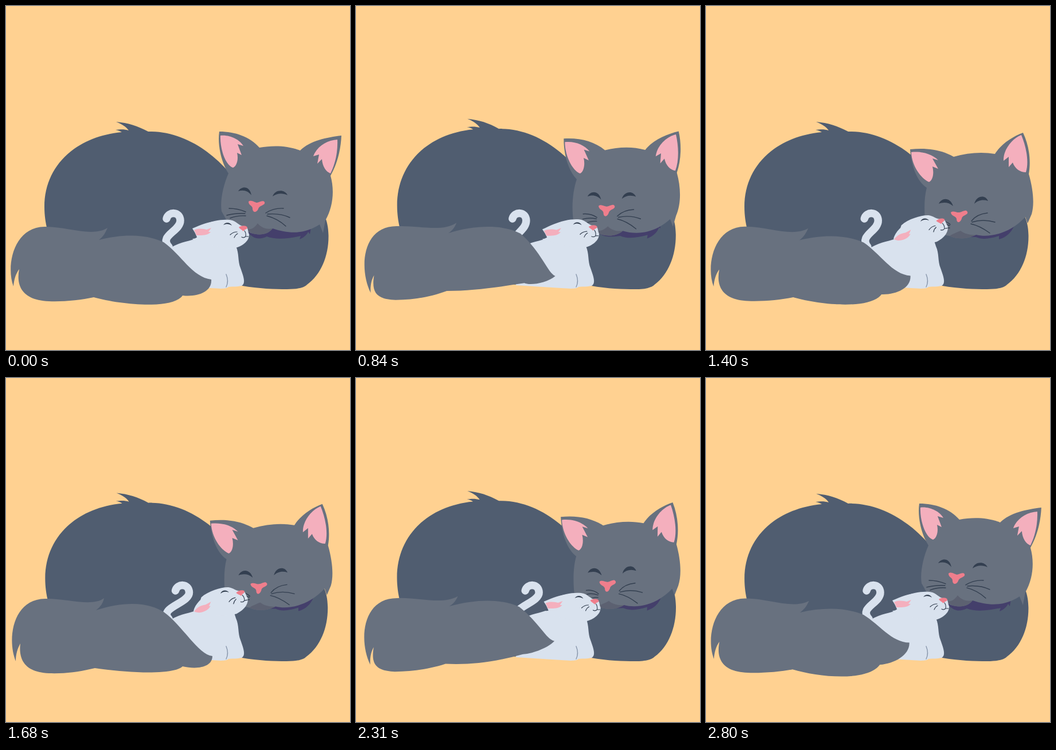
These frames come from a looping animation (600x600 px, 2.87 s). An HTML page:

```html
<!DOCTYPE html>
<html lang="en">
<head>
<meta charset="utf-8">
<title>Cat and kitten</title>
<style>
html, body { margin: 0; width: 100%; height: 100%; overflow: hidden; background: #ffd191; }
svg { display: block; width: 100vw; height: 100vh; }
.line { fill: none; stroke: #333f50; stroke-width: 1.4; stroke-linecap: round; }
</style>
</head>
<body>
<svg viewBox="0 0 600 600">
  <rect width="600" height="600" fill="#ffd191"/>
  <g id="cat">
    <path fill="#505d70" d="M248 219C229 209 213 204 192 202C202 206 209 210 214 217C207 215 201 215 191 216C196 217 199 218 202 220C120 228 67 280 67 350C67 365 69 378 72 390L90 486L405 486L412 488C440 493 470 494 490 494C510 494 520 491 525 486C550 468 563 435 562.5 400C562 385 560 375 555 365L480 300L390 291C350 245 300 218 248 219Z"/>
    <g id="head">
      <path id="collar" fill="#443f6b"/>
      <path id="skull" fill="#68717f"/>
      <path id="chin" fill="#5c6171"/>
      <path id="earL" fill="#f4afbd"/>
      <path id="earR" fill="#f4afbd"/>
      <path id="eyes" fill="#333f50"/>
      <path id="whiskers" class="line"/>
      <path id="nose" fill="#ef7e8c"/>
    </g>
  </g>
  <path id="curl" fill="none" stroke="#d9e2ee" stroke-width="13.5" stroke-linecap="round"/>
  <path fill="#d9e2ee" d="M288 421C305 411 322 410 336 404L395 400L401 419C407 432 404 445 409 457C414 471 419 484 411 488C403 490 396 489 388 490C384 494 372 493 358 492L279 487C277 470 287 440 288 421Z"/>
  <path class="line" style="stroke:#8896ab" d="M384 468Q389 480 384 490"/>
  <path id="gap" fill="none" stroke="#505d70" stroke-width="2.5" d="M331 405Q340 404 348 409"/>
  <g id="kit">
    <path fill="#d9e2ee" d="M345 382C360 373 385 371 395 374C405 378 407 384 416 384.500C424 387 421 392 424 398C425 408 415 418 400 422C380 424 350 415 340 411C335 408 330 411 325 406C334 406 336 400 338 395Z"/>
    <path id="kitEar" fill="#d9e2ee"/>
    <path id="kitPink" fill="#f4afbd"/>
    <path fill="#333f50" d="M379 382C383 376 391 377 394 383C389 379.500 384 379.500 379 382Z"/>
    <path class="line" style="stroke-width:1.200" d="M391 399Q396 394 403 394M398 404Q400 399 404 397M416 392Q419 396 418 402Q415 405 411 403M418 402L423 402"/>
    <path fill="#ef7e8c" d="M406 386C410 383 418 382 421 386C421 390 416 389 414 393C411 390 408 389 406 386Z"/>
  </g>
  <path id="tail" fill="#68717f"/>
</svg>
<script>
const LOOP = 2870, STEP = 70;
const el = id => document.getElementById(id);
const draw = (id, d) => el(id).setAttribute('d', d);
const place = (id, t) => el(id).setAttribute('transform', t);
const nums = s => s.match(/-?[\d.]+/g).map(Number);
const mix = (a, b, u) => a.map((v, i) => v + (b[i] - v) * u);

function morph([a, b], u) {
  const vals = mix(nums(a), nums(b), u);
  let i = 0;
  return a.replace(/-?[\d.]+/g, () => vals[i++].toFixed(2));
}

function ease(t, from, to) {
  const u = Math.min(1, Math.max(0, (t - from) / (to - from)));
  return (1 - Math.cos(Math.PI * u)) / 2;
}

// Smooth periodic curve through [time, vector] keys; the first key is at 0.
function spline(keys, t, period) {
  const n = keys.length;
  const key = j => {
    const [at, v] = keys[(j + n) % n];
    return [at + Math.floor(j / n) * period, v];
  };
  let i = n - 1;
  while (keys[i][0] > t) i--;
  const [p, a, b, q] = [-1, 0, 1, 2].map(k => key(i + k));
  const h = b[0] - a[0], u = (t - a[0]) / h, w = u * u * (3 - 2 * u);
  const ma = h * u * (1 - u) * (1 - u) / (b[0] - p[0]);
  const mb = h * u * u * (u - 1) / (q[0] - a[0]);
  return a[1].map((v, k) => v + (b[1][k] - v) * w
    + ma * (b[1][k] - p[1][k]) + mb * (q[1][k] - v));
}

// Each part of the head: upright, tilted
const face = {
  skull: [
    'M372 219C369 240 374 270 388 292C379 312 373 340 376 358L385 374L414 388C430 402 455 402 465 388C495 398 520 398 547 381L553 396L557 374C571 350 573 320 566 296C578 275 584 250 585 226C560 229 530 235 513 252C490 243 465 243 442 247C425 228 400 219 372 219Z',
    'M355 249C357 275 365 303 384 316C379 335 379 360 383 390L405 397L424 400C435 406 455 406 470 398C495 404 530 395 556 367L560 378L567 362C572 345 570 320 562 292C566 270 563 243 552 220C535 226 513 240 503 257C480 253 455 255 431 262C410 250 385 246 355 249Z'],
  chin: [
    'M414 387C425 392 432 389 439 379C446 388 457 390 465 388C455 402 430 402 414 387Z',
    'M424 400C430 396 436 394 443 391C449 396 460 399 470 398C455 406 435 406 424 400Z'],
  collar: [
    'M420 392C432 409 444 407 455 402C470 408 493 406 514 401L512 407C519 404 525 399 527 394L530 398L532 386L465 380Z',
    'M425 398C432 401 444 402 470 402C480 407 495 405 510 400L510 406C522 403 532 394 536 383L538 381L538 376L470 388Z'],
  earL: [
    'M374 226C390 224 408 233 414 244L404 241L411 260L403 256C406 268 402 280 396 282C383 278 373 250 374 226Z',
    'M357 254C375 252 393 257 404 268L394 265L404 283L394 279C397 290 395 303 388 306C374 300 358 278 357 254Z'],
  earR: [
    'M578 233C560 234 542 245 536 262L546 259L543 275L551 267C552 280 558 289 566 292C574 276 579 255 578 233Z',
    'M549 224C533 230 517 250 518 269L527 262L527 280L534 272C538 283 547 289 557 289C563 270 557 243 549 224Z'],
  eyes: [
    'M405 323C411 314 425 313 428 330C422 322 414 320 405 323ZM465 332C469 320 486 319 491 330C483 326 473 326 465 332Z',
    'M405 344C410 333 425 332 430 348C422 341 413 341 405 344ZM467 344C470 330 486 327 491 339C482 336 473 338 467 344Z'],
  nose: [
    'M423 341C428 337 434 343 438 343C443 342 449 338 451 342C453 348 442 347 440 354C437 361 430 361 430 353C430 348 423 348 423 341Z',
    'M426 359C431 355 436 360 441 359C447 358 452 353 455 358C457 364 446 363 445 370C442 378 436 378 436 370C435 365 427 366 426 359Z'],
  whiskers: [
    'M418 359Q404 353 389 353M417 362Q402 361 385 365M418 366Q404 365 391 370M453 361Q467 352 484 353M456 363Q478 361 495 369M455 366Q474 371 488 384',
    'M425 380Q416 372 404 374M424 382Q414 378 406 380M424 386Q414 386 402 392M462 374Q471 362 490 360M463 376Q482 370 503 376M461 379Q476 382 494 395']
};
const kitEar = [
  'M325 388C340 382 352 376 366 376L358 396C350 404 338 405 333 403Q330 395 325 388Z',
  'M327 403C332 392 345 382 366 376L360 398C350 408 340 408 336 408Q332 407 327 403Z'];
const kitPink = [
  'M328 391C336 387 345 389 350 390L358 387L353 394L357 394C352 401 340 400 332 400Q331 395 328 391Z',
  'M328 404C336 396 345 396 350 396L360 393L355 400L358 400C352 408 340 409 334 407Q331 406 328 404Z'];

// Tail poses within one breath
const rest = nums('177 387 150 404 105 384 67 385 12 386 0 455 13 489 14 477 17 467 23 459 18 485 25 513 75 515 100 516 130 513 153 508 200 521 290 530 308 505 335 508 360 498 358 477 325 473 305 433 275 412 245 398 205 397 162 408 170 402 173 396 177 387');
const low = nums('171 384 150 400 105 384 68 385 10 386 2 458 17 494 17 482 20 472 25 463 22 488 30 513 75 515 105 516 130 512 155 506 200 513 290 520 308 503 335 509 360 504 360 485 335 482 308 432 275 408 245 390 205 390 157 405 165 399 169 393 171 384');
const drop = nums('167 371 150 392 110 384 70 385 10 384 6 458 26 500 25 488 27 478 32 469 28 500 38 514 75 515 110 515 140 506 165 494 210 488 250 484 304 493 315 512 340 523 355 514 342 500 332 435 290 391 260 370 205 372 155 391 162 386 165 379 167 371');
const lift = nums('188 394 150 403 110 381 72 383 10 384 2 460 20 497 20 485 22 475 27 467 22 490 25 508 62 510 90 510 120 510 145 507 185 521 245 521 283 477 300 457 335 425 341 403 320 414 300 419 275 413 245 406 215 403 170 410 178 406 184 401 188 394');
const swish = [[0, rest], [.17, low], [.41, drop], [.47, mix(low, drop, 1.25)], [.77, lift]];
const wag = [[0, [291.5]], [560, [299]], [1120, [273]], [1680, [307]], [2030, [309]], [2520, [303]], [2800, [291.5]]];

function render(t) {
  const phase = t * 2 / LOOP % 1;
  const breath = (1 - Math.cos(2 * Math.PI * phase)) / 2;
  const tilt = ease(t, 560, 1090) - ease(t, 2180, 2760);
  const look = ease(t, 700, 1450) - ease(t, 1700, 2000);
  const shift = ease(t, 1750, 2020) - ease(t, 2450, 2800);

  place('cat', `translate(315 494) scale(${1 - .0205 * breath} ${1 + .019 * breath}) translate(-315 -494)`);
  place('head', `translate(${tilt} ${tilt})`);
  for (const id in face) draw(id, morph(face[id], tilt));

  place('kit', `translate(${2.5 * shift} ${2 * shift}) rotate(${-11 * look} 345 405)`);
  draw('kitEar', morph(kitEar, look));
  draw('kitPink', morph(kitPink, look));
  el('gap').setAttribute('opacity', shift);

  const x = spline(wag, t, LOOP)[0], root = 284 - Math.max(0, 291 - x) * .65;
  draw('curl', `M${root} 420C${266} 400 ${x + 13} 393 ${x + 12.5} 374C${x + 12} 358 ${x - 8} 358 ${x - 11.5} 371`);

  const [x0, y0, ...rest] = spline(swish, phase, 1);
  draw('tail', `M${x0} ${y0}C${rest.join(' ')}Z`);
}

const start = performance.now();
function tick() {
  const t = (performance.now() - start) % LOOP;
  render(Math.floor(t / STEP) * STEP);
  requestAnimationFrame(tick);
}
tick();
</script>
</body>
</html>
```
